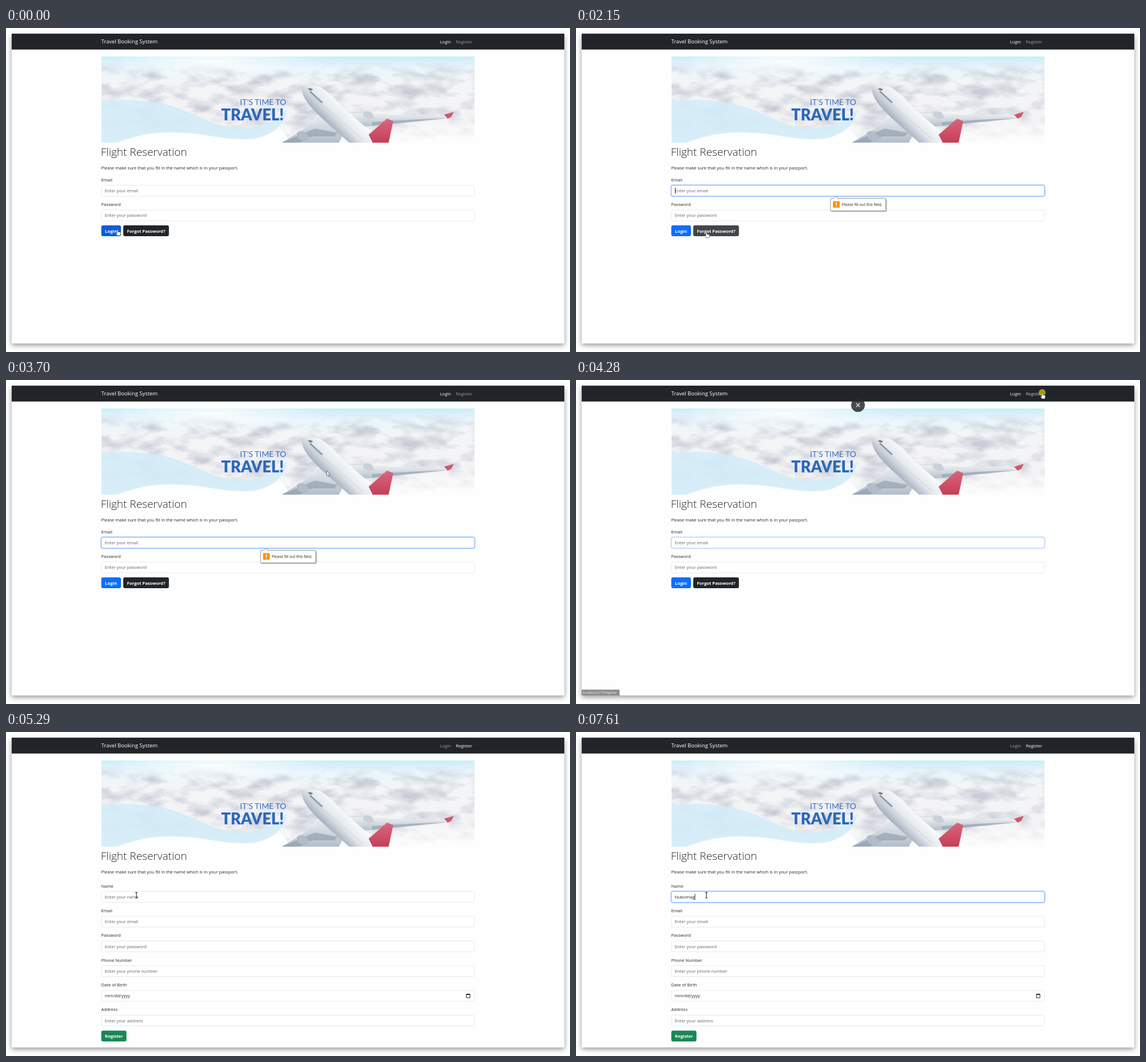
An HTML page that plays this animation: 986 px wide and 568 px high, repeating every 8 s.

```html
<!DOCTYPE html>
<html lang="en">
<head>
<meta charset="utf-8">
<title>Travel Booking System</title>
<style>
html, body { margin: 0; width: 100%; height: 100%; overflow: hidden; background: #fff; }
svg { display: block; width: 100%; height: 100%; }
text { font: 7.58px "Open Sans", "Noto Sans", sans-serif; fill: #212529; white-space: pre; }
.window { fill: #fefefe; filter: drop-shadow(0 3px 5px rgba(0, 0, 0, .42)); }
.brand { font-size: 9.45px; fill: #fff; }
.nav { fill: #fff; }
.title { font-size: 19px; font-weight: 300; }
.hint { fill: #606468; }
.button { font-size: 7.7px; font-weight: 700; fill: #fff; }
.slogan { font-family: Lato, sans-serif; font-size: 13.9px; fill: #3a70c3; text-anchor: middle; }
.slogan.big { font-size: 27.3px; font-weight: 900; fill: #2d68ba; }
.small { font-size: 6.64px; }
.status { font-size: 5.6px; fill: #ddd; }
.box { fill: #fff; stroke: #dee2e6; stroke-width: .8; }
.ring { fill: none; stroke: #c2dbfe; stroke-width: 2; }
.edge { fill: none; stroke: #86b7fe; stroke-width: .9; }
.caret { stroke: #111; stroke-width: .9; }
.tip { fill: #fff; stroke: #8a8a8a; stroke-width: .8; filter: drop-shadow(1px 1px 1px rgba(0, 0, 0, .4)); }
</style>
</head>
<body>
<svg viewBox="0 0 986 568" xmlns="http://www.w3.org/2000/svg">
  <defs>
    <clipPath id="windowClip"><path d="M10 10H976V553H10z"/></clipPath>
    <clipPath id="bannerClip"><path d="M167 50H819V201H167z"/></clipPath>
    <linearGradient id="sky" x2="0" y2="1">
      <stop offset="0" stop-color="#c9ecf8"/>
      <stop offset=".13" stop-color="#e9f6fb"/>
      <stop offset=".3" stop-color="#f4f5f7"/>
      <stop offset=".75" stop-color="#f3f3f5"/>
      <stop offset="1" stop-color="#fdfdfe"/>
    </linearGradient>
    <radialGradient id="glow">
      <stop offset="0" stop-color="#fff" stop-opacity=".85"/>
      <stop offset="1" stop-color="#fff" stop-opacity="0"/>
    </radialGradient>
    <linearGradient id="fade" x2="0" y2="1">
      <stop offset=".05" stop-color="#000"/>
      <stop offset=".22" stop-color="#fff"/>
      <stop offset=".65" stop-color="#fff"/>
      <stop offset="1" stop-color="#333"/>
    </linearGradient>
    <mask id="cloudMask"><path fill="url(#fade)" d="M167 50H819V201H167z"/></mask>
    <filter id="clouds" x="0" y="0" width="1" height="1" color-interpolation-filters="sRGB">
      <feTurbulence type="fractalNoise" baseFrequency=".022 .05" numOctaves="4" seed="7"/>
      <feColorMatrix values="0 0 0 0 .78  0 0 0 0 .8  0 0 0 0 .84  2.6 0 0 0 -1.05"/>
    </filter>
    <linearGradient id="hull" gradientUnits="userSpaceOnUse" x1="596" y1="140" x2="566" y2="170">
      <stop offset="0" stop-color="#fafbfc"/>
      <stop offset=".55" stop-color="#e3e7ec"/>
      <stop offset="1" stop-color="#a9b3c0"/>
    </linearGradient>
    <linearGradient id="wing" x2="0" y2="1">
      <stop offset="0" stop-color="#eef1f4"/>
      <stop offset="1" stop-color="#b3bdc9"/>
    </linearGradient>
    <linearGradient id="tail" x2="0" y2="1">
      <stop offset="0" stop-color="#d9667a"/>
      <stop offset="1" stop-color="#c43f59"/>
    </linearGradient>
  </defs>

  <path class="window" d="M10 10H976V553H10z"/>
  <path fill="#212529" d="M10 10H976V37.8H10z"/>
  <text class="brand" x="166.5" y="27.3">Travel Booking System</text>
  <text class="nav" id="navLogin" x="758.7" y="26.8">Login</text>
  <text class="nav" id="navRegister" x="786.5" y="26.8">Register</text>

  <g clip-path="url(#bannerClip)">
    <path fill="url(#sky)" d="M167 50H819V201H167z"/>
    <g mask="url(#cloudMask)"><path filter="url(#clouds)" d="M167 50H819V201H167z"/></g>
    <ellipse cx="360" cy="58" rx="190" ry="32" fill="url(#glow)"/>
    <ellipse cx="770" cy="205" rx="130" ry="50" fill="url(#glow)"/>
    <path fill="#fff" opacity=".9" d="M185 201C240 178 290 182 340 186C400 196 440 194 478 176L500 201z"/>
    <path fill="#d3edf9" opacity=".88" d="M167 128C225 121 285 130 330 152C370 172 400 180 440 172C465 166 480 158 492 140C487 178 452 195 420 195C370 196 350 183 290 183C250 183 222 190 195 201H167z"/>

    <path fill="url(#wing)" d="M586 149L640 150 700 153 764 155 771 159 706 165 650 171 612 174z"/>
    <path fill="#8f9baa" opacity=".6" d="M640 171L706 165 768 158 700 161 640 165z"/>
    <path fill="#c9d0d8" d="M625 147q9-3 15 2l4 9-10 2-10-6z"/>
    <path fill="url(#wing)" d="M551 149L566 165 590 186 582 201H482L520 178 540 165z"/>
    <path fill="#8996a6" opacity=".55" d="M482 201L540 176 580 184 574 190 535 190 512 201z"/>
    <path fill="#b2bcc8" d="M508 184q7-6 15-1l9 10-9 6-12-5z"/>
    <path fill="url(#hull)" d="M518 112C516 102 531 97 549 103C566 113 580 130 598 147L660 201H600L552 158C537 143 521 128 518 112z"/>
    <path fill="none" stroke="#7d8998" stroke-width="1" stroke-dasharray="1 2.4" d="M533 118Q570 148 624 196"/>
    <path fill="#75818f" d="M527 107l5-2 5 3-4 2z"/>
    <path fill="none" stroke="#8f9aa8" stroke-width="3" d="M531 111l22 20"/>
    <path fill="url(#tail)" d="M666 159L677 163 669 201H641L634 187z"/>
    <path fill="#d2576d" d="M783 147L766 152 772 159 778 156z"/>
    <text class="slogan" x="449.5" y="135.2">IT’S TIME TO</text>
    <text class="slogan big" x="431" y="162.3">TRAVEL!</text>
  </g>

  <text class="title" x="165.8" y="224">Flight Reservation</text>
  <text x="166.5" y="248.3">Please make sure that you fill in the name which is in your passport.</text>

  <g id="loginPage"></g>
  <g id="registerPage"></g>

  <g id="tooltip">
    <path class="tip" d="M446 299H450.5L454 295 457.500 299H540.500Q541.500 299 541.500 300V319.500Q541.500 320.500 540.500 320.500H446Q445 320.500 445 319.500V300Q445 299 446 299z"/>
    <rect x="449.300" y="303.500" width="11.700" height="11.500" rx="1" fill="#fb9214"/>
    <path stroke="#fff" stroke-width="1.500" d="M455.200 305.500V310.500M455.200 311.700V313.200"/>
    <text class="small" x="464.700" y="312.300">Please fill out this field.</text>
  </g>

  <g id="forgotStatus">
    <path fill="#222426" d="M10 542.700H99Q100.500 542.700 100.500 544.200V553H10z"/>
    <text class="status" x="11.700" y="550.300">localhost:5173/forgot-password</text>
  </g>
  <g id="registerStatus">
    <path fill="#222426" d="M10 542.700H74.700Q76.200 542.700 76.200 544.200V553H10z"/>
    <text class="status" x="11.700" y="550.300">localhost:5173/register</text>
  </g>

  <g clip-path="url(#windowClip)">
    <g id="closer">
      <circle r="12" fill="#282a2e" opacity=".85"/>
      <path stroke="#fff" stroke-width="1.200" d="M-3.300-3.300L3.300 3.300M3.300-3.300L-3.300 3.300"/>
    </g>
  </g>

  <g id="cursor">
    <circle id="click" r="6" fill="#c8bc00" opacity=".8"/>
    <path id="hand" fill="#fff" stroke="#222" stroke-width=".6" d="M-1 1c0-1.400 2-1.400 2 0v3.200l3.800.9q1 .3.9 1.300l-.6 3-.8 1.600h-4.600l-3-4q.3-1 1.300-.4l1 .9z"/>
    <path id="arrow" fill="#fff" stroke="#333" stroke-width=".6" d="M0 0v8.400l1.900-1.700 1.400 3 1.300-.6-1.300-2.900h2.600z"/>
    <path id="beam" fill="none" stroke="#222" stroke-width="1.100" d="M-2-5q1.600 0 2 .8q.4-.8 2-.8M0-4.200v8.400M-2 5q1.600 0 2-.8q.4.800 2 .8"/>
  </g>
</svg>
<script>
const LOOP = 8000;
const ROW = 43.35;
const SWITCH = 4440;
const $ = id => document.getElementById(id);

const field = (label, hint, top, id = '') => `
  <text x="166.5" y="${top - 7.1}">${label}</text>
  <rect class="box" x="166.800" y="${top}" width="652.200" height="18.900" rx="2.800"/>
  ${id && `<g id="${id}Focus">
    <rect class="ring" x="165.900" y="${top - .9}" width="654" height="20.700" rx="3.600"/>
    <rect class="edge" x="166.800" y="${top}" width="652.200" height="18.900" rx="2.800"/>
  </g>`}
  <text class="hint" id="${id}Hint" x="172.700" y="${top + 12.3}">${hint}</text>
  ${id && `<path class="caret" id="${id}Caret" d="M173.600 ${top + 4.2}v10.500"/>`}`;

const button = (label, x, y, width, color, id) => `
  <rect id="${id}" x="${x}" y="${y}" width="${width}" height="19" rx="3" fill="${color}"/>
  <text class="button" x="${x + 6.5}" y="${y + 12.4}">${label}</text>`;

const loginTop = 275.8, registerTop = 279.7;
$('loginPage').innerHTML =
  field('Email', 'Enter your email', loginTop, 'email') +
  field('Password', 'Enter your password', loginTop + ROW) +
  button('Login', 166.6, 346.1, 34.4, '#0d6efd', 'loginButton') +
  button('Forgot Password?', 205, 346.1, 79.8, '#212529', 'forgotButton');

$('registerPage').innerHTML = [
  ['Name', 'Enter your name', 'name'],
  ['Email', 'Enter your email'],
  ['Password', 'Enter your password'],
  ['Phone Number', 'Enter your phone number'],
  ['Date of Birth', '<tspan fill="#212529">mm/dd/yyyy</tspan>'],
  ['Address', 'Enter your address'],
].map(([label, hint, id], i) => field(label, hint, registerTop + ROW * i, id)).join('') + `
  <path fill="none" stroke="#111" stroke-width=".9" d="M804.900 459.700h6.200v6.300h-6.200zM804.900 460.500h6.200M806.300 458.500v1.500M809.700 458.500v1.500"/>` +
  button('Register', 166.6, 523.5, 44, '#198754', 'registerButton');

const path = [
  [0, 195, 353], [1660, 195, 353], [1900, 212, 355], [2150, 228, 357], [2490, 228, 357],
  [2990, 238, 350], [3110, 256, 306], [3360, 341, 282], [3700, 560, 160], [4030, 800, 26],
  [4110, 825, 16], [4190, 815, 22], [4360, 815, 22], [4700, 660, 110], [5030, 378, 276],
  [5150, 290, 288], [5290, 228, 286], [LOOP, 228, 286],
];
const typed = 'Nubomag';
const keyTimes = [6560, 6860, 7110, 7270, 7350, 7530, 7610];
const clicks = [920, 4190, 5920];

const ramp = (t, from, to) => Math.min(1, Math.max(0, (t - from) / (to - from)));
const pulse = (t, inAt, outAt, span = 150) => ramp(t, inAt, inAt + span) - ramp(t, outAt, outAt + span);
const within = (t, from, to) => t >= from && t < to;
const show = (id, on) => { $(id).style.display = on ? '' : 'none'; };
const mix = (a, b, k) => `rgb(${a.map((v, i) => Math.round(v + (b[i] - v) * k))})`;
const fade = (id, k) => { $(id).style.opacity = k; };

function pointer(t) {
  const i = path.findIndex(p => p[0] > t);
  const [t0, x0, y0] = path[i - 1], [t1, x1, y1] = path[i];
  const k = ramp(t, t0, t1);
  return [x0 + (x1 - x0) * k, y0 + (y1 - y0) * k];
}

function pointerKind(x, y, onRegister) {
  const inColumn = x > 167 && x < 819;
  if (y < 34 && x > 755 && x < 819) return 'hand';
  if (!onRegister && within(y, 346, 365) && x < 285) return 'hand';
  const offset = y - (onRegister ? registerTop : loginTop);
  const rows = onRegister ? 6 : 2;
  return inColumn && offset >= 0 && offset < rows * ROW && offset % ROW < 19 ? 'beam' : 'arrow';
}

function draw(t) {
  const onRegister = t >= SWITCH;
  show('loginPage', !onRegister);
  show('registerPage', onRegister);
  fade('navLogin', onRegister ? .55 : 1);
  fade('navRegister', onRegister ? 1 : .55 + .2 * ramp(t, 4030, 4180));

  $('loginButton').setAttribute('fill', mix([11, 94, 215], [13, 110, 253], ramp(t, 1770, 1920)));
  $('forgotButton').setAttribute('fill', mix([33, 37, 41], [66, 70, 73], pulse(t, 1810, 3040)));

  fade('emailFocus', pulse(t, 920, 4190, 180));
  show('emailCaret', within(t, 1000, 4190) && (t - 1000) % 1000 < 500);

  show('tooltip', within(t, 1000, 4190));
  fade('tooltip', ramp(t, 1000, 1160));
  const scale = .965 + .035 * ramp(t, 1000, 1660);
  $('tooltip').setAttribute('transform', `translate(445 299) scale(${scale}) translate(-445 -299)`);

  fade('forgotStatus', pulse(t, 2260, 3360));
  fade('registerStatus', pulse(t, 4190, 5060, 180));

  const closerY = -4 + 48 * (ramp(t, 4030, 4190) - ramp(t, 4360, 4600));
  $('closer').setAttribute('transform', `translate(493 ${closerY})`);

  fade('nameFocus', ramp(t, 5920, 6080));
  const count = keyTimes.filter(k => t >= k).length;
  const name = $('nameHint');
  name.textContent = count ? typed.slice(0, count) : 'Enter your name';
  name.style.fill = count ? '#212529' : '';
  show('nameCaret', t >= 6060);
  const caretShift = count && onRegister ? name.getComputedTextLength() - .7 : 0;
  $('nameCaret').setAttribute('transform', `translate(${caretShift} 0)`);

  const [x, y] = pointer(t);
  $('cursor').setAttribute('transform', `translate(${x} ${y})`);
  const kind = pointerKind(x, y, onRegister);
  for (const id of ['hand', 'arrow', 'beam']) show(id, id === kind);
  show('click', clicks.some(c => within(t, c, c + 165)));
}

const start = performance.now();
function tick() {
  draw((performance.now() - start) % LOOP);
  requestAnimationFrame(tick);
}
tick();
</script>
</body>
</html>
```
